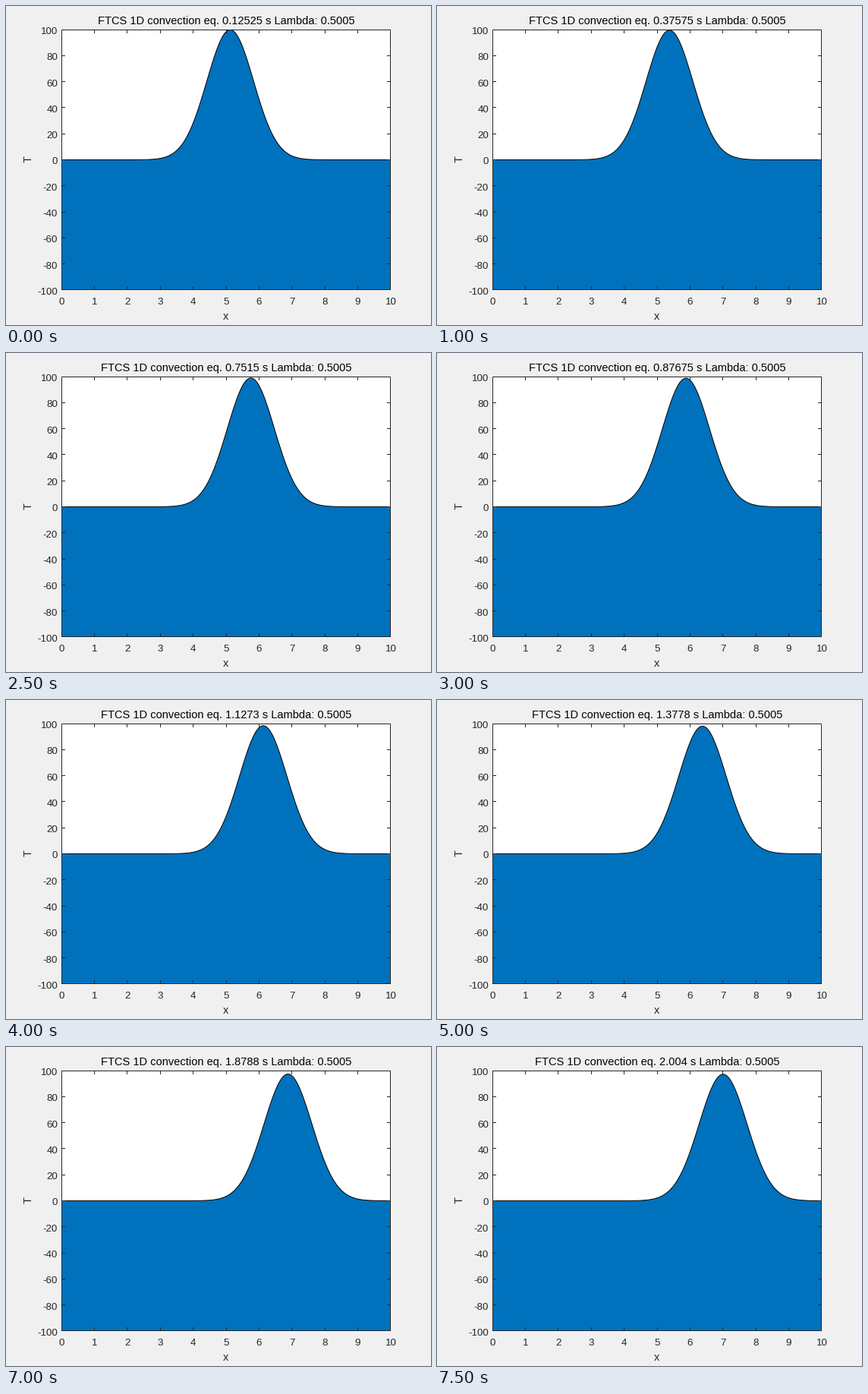
A matplotlib script for the animation above (8 s loop, 560x420 px).

```python
import numpy as np
import matplotlib.pyplot as plt
from matplotlib.animation import FuncAnimation
from matplotlib.patches import Polygon, Rectangle

W, H, DPI = 560, 420, 100
LEFT, RIGHT, TOP, BOTTOM = 73, 507, 31, 374   # outer edges of the plot box
FRAMES, INTERVAL = 16, 500
STEP = 0.12525        # simulated seconds per frame
LAMBDA = 0.5005
DX = 10 / 999
DIFFUSION = DX * (1 - LAMBDA**2) / (2 * LAMBDA)
GREY = "#262626"
LINE = 72 / DPI       # one pixel in points
TICK = 5              # tick length, box line included

plt.rcParams["font.family"] = "Liberation Sans"
plt.rcParams["axes.unicode_minus"] = False
plt.rcParams["path.snap"] = False   # coordinates are already pixel centres

fig = plt.figure(figsize=(W / DPI, H / DPI), dpi=DPI, facecolor="#f0f0f0")
ax = fig.add_axes([0, 0, 1, 1])
ax.set(xlim=(0, W), ylim=(H, 0))
ax.axis("off")


def px(x):
    return LEFT + (RIGHT - LEFT) * x / 10


def py(temp):
    return BOTTOM - (BOTTOM - TOP) * (temp + 100) / 200


def label(x, y, s, size, color=GREY, ha="center", **kw):
    return ax.text(x, y, s, fontsize=size * 72 / DPI, color=color,
                   ha=ha, va="baseline", **kw)


def stroke(xs, ys):
    ax.plot(xs, ys, color=GREY, lw=LINE, solid_capstyle="butt", zorder=4)


def pulse(x, t):
    """Travelling Gaussian, spread by the scheme's numerical diffusion."""
    var = 0.5 + 2 * DIFFUSION * t
    return 100 * np.sqrt(0.5 / var) * np.exp(-(x - 5 - t) ** 2 / (2 * var))


panel = Rectangle((LEFT, TOP), RIGHT - LEFT, BOTTOM - TOP, fc="white",
                  ec="none", zorder=1)
ax.add_patch(panel)
ax.add_patch(Rectangle((LEFT + 0.5, TOP + 0.5), RIGHT - LEFT - 1,
                       BOTTOM - TOP - 1, fc="none", ec=GREY, lw=LINE,
                       joinstyle="miter", zorder=4))

for i in range(11):
    label(px(i), 393, str(i), 13.33)
    if 0 < i < 10:
        x = np.floor(px(i)) + 0.5
        stroke([x, x], [TOP, TOP + TICK])
        stroke([x, x], [BOTTOM - TICK, BOTTOM])

for temp in range(-100, 101, 20):
    label(68, py(temp) + 6, str(temp), 13.33, ha="right")
    if abs(temp) < 100:
        y = np.floor(py(temp)) + 0.5
        stroke([LEFT, LEFT + TICK], [y, y])
        stroke([RIGHT - TICK, RIGHT], [y, y])

label(290, 413, "x", 14.67)
label(34, 202, "T", 14.67, rotation=90, rotation_mode="anchor")
title = label(290, 24, "", 14.67, color="black")

grid = np.linspace(0, 10, 1000)
area = Polygon([(LEFT, BOTTOM), (RIGHT, BOTTOM), (RIGHT, TOP)], fc="#0072bd",
               ec="black", lw=LINE, joinstyle="miter", zorder=3)
ax.add_patch(area)
area.set_clip_path(panel)


def update(k):
    t = STEP * (k + 1)
    curve = np.column_stack([px(grid), py(pulse(grid, t))])
    area.set_xy(np.vstack([[LEFT, BOTTOM], curve, [RIGHT, BOTTOM]]))
    title.set_text(f"FTCS 1D convection eq. {t + 1e-9:.5g} s Lambda: {LAMBDA}")
    return area, title


anim = FuncAnimation(fig, update, frames=FRAMES, interval=INTERVAL,
                     init_func=lambda: update(0), repeat=True, repeat_delay=0)
plt.show()
```
